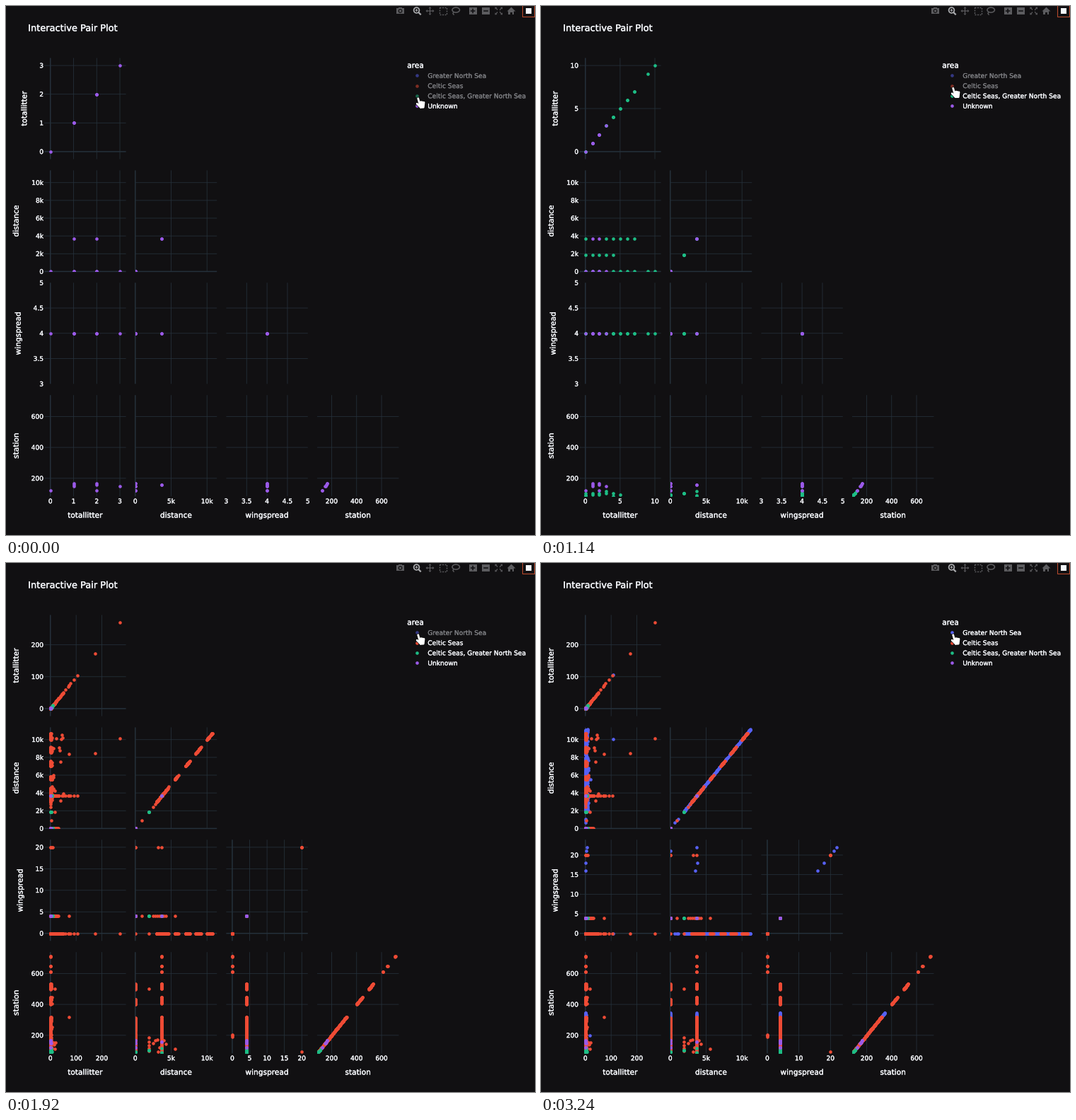
Animation, 748 px wide and 748 px high, one loop 3300 ms. Source, as a matplotlib script:

```python
import numpy as np
import matplotlib.pyplot as plt
from matplotlib.animation import FuncAnimation
from matplotlib.patches import Circle, Ellipse, Polygon, Rectangle
from matplotlib.patheffects import withStroke

SIZE, DPI = 748, 64
FRAMES, STEP = 55, 60
SWITCH = (7, 25, 43)             # frames where one more series is turned on
CLIMBS = (10, 28)                # frames where the cursor starts to move up

BG, INK, MUTED = "#111012", "#f6f8fc", "#7b7c80"
GRID, ICON, ACTIVE = "#25313b", "#5c5c5f", "#a9aaad"
AREAS = ("Greater North Sea", "Celtic Seas",
         "Celtic Seas, Greater North Sea", "Unknown")
COLORS = ("#5761f6", "#ee4b35", "#1dbd85", "#9b5ae9")
VARS = ("totallitter", "distance", "wingspread", "station")
FIXED = {1: (0, 11380), 3: (84, 738)}

COL = 53.7 + 128.6 * np.arange(4)
ROW = 73 + 158.9 * np.arange(4)
W, H = 115.4, 143
PAD = 0.0742                     # margin inside a panel, as a share of it
NAN = np.nan

plt.rcParams.update({"font.family": "DejaVu Sans", "text.hinting": "none",
                     "toolbar": "None"})
fig = plt.figure(figsize=(SIZE / DPI, SIZE / DPI), dpi=DPI, facecolor=BG)
ax = fig.add_axes([0, 0, 1, 1])
ax.set(xlim=(-0.5, SIZE - 0.5), ylim=(SIZE - 0.5, -0.5))
ax.axis("off")


def px(v):
    return v * 72 / DPI


def text(x, y, s, size, ha="left", rot=0, color=INK):
    """Text whose capitals are centred on the given point."""
    drop = 0.36 * size
    x, y = (x + drop, y) if rot else (x, y + drop)
    return ax.text(x, y, s, size=px(size), color=color, ha=ha, va="baseline",
                   rotation=rot, rotation_mode="anchor",
                   path_effects=[withStroke(linewidth=px(0.25),
                                            foreground=color)])


def line(xs, ys, color, width, cap="butt", **kw):
    return ax.plot(xs, ys, color=color, lw=px(width), snap=False,
                   solid_capstyle=cap, **kw)[0]


def dots(xs, ys, color, **kw):
    return ax.plot(xs, ys, "o", ms=px(4.6), mew=0, color=color, **kw)[0]


# ---- data: rows of totallitter, distance, wingspread, station ----
rng = np.random.default_rng(11)


def rows(tot, dist, wing, stn=NAN):
    return np.column_stack(np.broadcast_arrays(
        *(np.asarray(v, float) for v in (tot, dist, wing, stn))))


def spread(n, *ranges):
    return np.concatenate([rng.uniform(a, b, n) for a, b in ranges])


def counts(n, scale, cap):
    return np.floor(np.minimum(rng.exponential(scale, n), cap))


def stations(values, scale):
    """Standard tows, alternately without and with a distance."""
    n = len(values)
    return rows(counts(n, scale, 7), np.where(np.arange(n) % 2, 3680, 0), 4,
                values)


def north_sea():
    return np.vstack([
        rows(counts(300, 3, 13), spread(150, (1950, 6000), (6000, 11200)), 0),
        rows(1, np.linspace(650, 1100, 3), 0),
        rows([2, 1, 4, 5], [3500, 3800, 0, 3680], [16, 18, 21, 22]),
        stations(spread(30, (90, 345), (300, 345)), 1.5),
        rows([107, 20, 17], [10050, 5500, 3680], 0, [NAN, NAN, 200]),
    ])


def celtic():
    bands = [(s, s + 550 + 0.04 * (s - 5500)) for s in range(5500, 10001, 1500)]
    tows = spread(30, (2950, 3900), (3600, 4700), *bands)
    far = spread(3, (185, 210), (598, 616), (644, 653), (699, 716))
    return np.vstack([
        rows(counts(len(tows), 2.6, 16), tows, 0),
        rows(spread(9, (17, 55)), rng.choice(tows, 9), 0),
        rows([72, 173, 270], [8400, 8450, 10130], 0),
        stations(spread(34, *[(85, 320)] * 5, (400, 447), (497, 535)), 1.6),
        rows(counts(len(far), 1, 2), 3680, 0, far),
        rows(np.arange(0, 36, 2), 3700, 0),
        rows(np.geomspace(44, 105, 7), 3720, 0),
        rows(np.arange(0, 31, 2), 0, 4),
        rows(3, [0, 900, 1850], [0, 4, 0]),
        rows([0, 2, 5, 8], [0, 3150, 3680, 0], 20, [NAN, 93, NAN, NAN]),
        rows(np.arange(5), 1850, 4, np.geomspace(100, 185, 5)),
        rows(counts(7, 2, 6), np.linspace(2450, 4300, 7), 4,
             spread(7, (90, 240))),
        rows(np.linspace(13, 21, 4), 0, 4, spread(4, (105, 155))),
        rows([16, 72, 0], [1850, 3680, 5500], 4, [500, 320, 112]),
    ])


def both():
    return np.vstack([
        rows(np.arange(5), 1850, 4, 104),
        rows(np.arange(3, 8), 3680, 4, [118, 87, NAN, NAN, NAN]),
        rows([0, 0, 1, 2, 5], [3680, 0, 0, 0, 0], 4, np.linspace(88, 96, 5)),
        rows([4, 6, 7, 9, 10], 0, 4),
    ])


def unknown():
    return rows([0, 1, 1, 1, 2, 2, 2, 3], [0, 0, 0, 3680, 0, 3680, 0, 0], 4,
                [121, 165, 150, 157, 166, 156, 121, 148])


SERIES = (north_sea(), celtic(), both(), unknown())


# ---- axes ----
def limits(var, data):
    if var in FIXED:
        return FIXED[var]
    lo, hi = np.nanmin(data[:, var]), np.nanmax(data[:, var])
    margin = (hi - lo) * PAD / (1 - 2 * PAD) or 1
    return lo - margin, hi + margin


def ticks(lo, hi, most):
    """Round values inside a range, on the finest grid that fits."""
    steps = (m * 10.0 ** e for e in range(-1, 5) for m in (1, 2, 5))
    step = next(s for s in steps if (hi - lo) / s < most)
    return np.arange(np.ceil(lo / step), np.floor(hi / step) + 1) * step + 0.0


def label(var, v):
    return f"{v / 1000:g}k" if var == 1 and v else f"{v:g}"


def build(view):
    """All artists that belong to one view."""
    out = []
    shown = range(3 - view, 4)
    data = np.vstack([SERIES[k] for k in shown])
    lims = [limits(k, data) for k in range(4)]

    def to_x(k, v):
        lo, hi = lims[k]
        return COL[k] + W * (v - lo) / (hi - lo)

    def to_y(k, v):
        lo, hi = lims[k]
        return ROW[k] + H * (hi - v) / (hi - lo)

    def rule(v, pos, start, size, draw):
        if v == 0 or start + 1 < pos < start + size - 1:
            out.append(draw(0.8 if v else 1.5))

    for r in range(4):
        for c in range(r + 1):
            x0, y0 = COL[c], ROW[r]
            clip = Rectangle((x0, y0 + H), W, -H, transform=ax.transData)
            for v in ticks(*lims[c], 5):
                x = to_x(c, v)
                rule(v, x, x0, W,
                     lambda w: line([x, x], [y0, y0 + H], GRID, w))
            for v in ticks(*lims[r], 5.75):
                y = to_y(r, v)
                rule(v, y, y0, H,
                     lambda w: line([x0, x0 + W], [y, y], GRID, w))
            for k in shown:
                d = SERIES[k]
                p = dots(to_x(c, d[:, c]), to_y(r, d[:, r]), COLORS[k],
                         zorder=3)
                p.set_clip_path(clip)
                out.append(p)

    for k, name in enumerate(VARS):
        for v in ticks(*lims[k], 5):
            out.append(text(to_x(k, v), 699.5, label(k, v), 9.1, "center"))
        names = [label(k, v) for v in ticks(*lims[k], 5.75)]
        for v, s in zip(ticks(*lims[k], 5.75), names):
            out.append(text(52.6, to_y(k, v), s, 9.1, "right"))
        # the title moves out with the widest tick label
        wide = max(len(s) - 0.5 * ("." in s) for s in names)
        out.append(text(30.8 - 5.8 * wide, ROW[k] + H / 2, name, 10.6,
                        "center", 90))

    for k, (name, color) in enumerate(zip(AREAS, COLORS)):
        y, on = 98 + 14.3 * k, k in shown
        out.append(dots([580.5], [y], color, alpha=1 if on else 0.5))
        out.append(text(595.8, y, name, 9.1, color=INK if on else MUTED))
    return out


# ---- toolbar ----
def add(shape, *args, **kw):
    ax.add_patch(shape(*args, **{"lw": 0, **kw}))


def box(x, y, w, h, color=ICON, **kw):
    add(Rectangle, (x - w / 2, y - h / 2), w, h, color=color, **kw)


def arrows(x, y, angle, reach):
    for a in np.radians(angle + 90 * np.arange(4)):
        u = np.array([np.cos(a), np.sin(a)])
        side = 2 * np.array([-u[1], u[0]])
        tip = u * reach + (x, y)
        back = tip - 2.4 * u
        line([x, back[0]], [y, back[1]], ICON, 1.2)
        add(Polygon, [tip, back + side, back - side], color=ICON)


def sign(x, y, r, color, width, plus):
    line([x - r, x + r], [y, y], color, width)
    if plus:
        line([x, x], [y - r, y + r], color, width)


def toolbar():
    y = 6.5
    box(557, y, 11.5, 8)
    box(557, y - 4, 5, 2)
    for r, color in ((2.9, BG), (1.7, ICON)):
        add(Circle, (557, y), r, color=color)

    add(Circle, (580, y - 1), 3.9, fill=False, ec=ACTIVE, lw=px(1.7))
    line([582.6, 586.2], [y + 1.8, y + 5.4], ACTIVE, 2.2)
    sign(580, y - 1, 2, ACTIVE, 1.1, True)

    arrows(599, y, 0, 6)
    add(Rectangle, (612.5, y - 5), 10.5, 10.5, fill=False, ec=ICON,
        lw=px(1.4), ls=(0, (1.4, 1.1)))
    add(Ellipse, (635.7, y - 1.4), 10.5, 7, fill=False, ec=ICON, lw=px(1.5))
    line([632.6, 631.4, 633], [y + 1.5, y + 3.5, y + 5.7], ICON, 1.4)
    for x, plus in ((659.6, True), (678, False)):
        box(x, y, 11, 11)
        sign(x, y, 3.3, BG, 1.6, plus)
    arrows(696.2, y, 45, 7.6)
    box(696.2, y, 3.5, 3.5, BG, zorder=3)

    add(Polygon, [(708, y + 0.5), (714, y - 5.4), (720, y + 0.5)], color=ICON)
    box(714, y + 2.6, 8, 5.4)
    box(714, y + 3.6, 2.6, 3.6, BG)
    add(Rectangle, (729.8, -1.5), 16.6, 16.2, fill=False, ec="#b5492c",
        lw=px(1.1))
    box(738.3, y + 0.3, 8, 8, INK)


toolbar()
text(30.7, 30.3, "Interactive Pair Plot", 12.95)
text(566.7, 83.2, "area", 10.6)
for x0, name in zip(COL, VARS):
    text(x0 + W / 2, 719.2, name, 10.6, "center")
views = [build(v) for v in range(4)]


# ---- pointing hand: round strokes from the fingertips to the wrist ----
def hand_strokes():
    k = np.arange(5)
    tips = np.column_stack([4.3 + 2.1 * (k - 1), 6 + 0.4 * (k - 1)])
    tips[0], tips[-1] = (0.2, 1.2), (-1.3, 8.7)       # index, thumb
    ends = np.column_stack([3.8 + 1.3 * k, np.full(5, 13.7)])
    ends[-1] = ends[0]
    gaps = np.full((5, 2), NAN)
    return np.stack([tips, ends, gaps], axis=1).reshape(-1, 2)


HAND = hand_strokes()
hand = [line([], [], color, width, "round", zorder=9)
        for color, width in (("#0a0a0a", 4.2), ("white", 2.8))]


def cursor_y(i):
    t = np.clip((i - np.array(CLIMBS)) / 4, 0, 1)
    return 129 - 14.5 * np.sum(t * t * (3 - 2 * t))


def update(i):
    view = sum(i >= s for s in SWITCH)
    for k, group in enumerate(views):
        for artist in group:
            artist.set_visible(k == view)
    for part in hand:
        part.set_data(*(HAND + (582, cursor_y(i))).T)
    return []


anim = FuncAnimation(fig, update, frames=FRAMES, interval=STEP, repeat=True,
                     repeat_delay=0, init_func=lambda: update(0))
plt.show()
```
